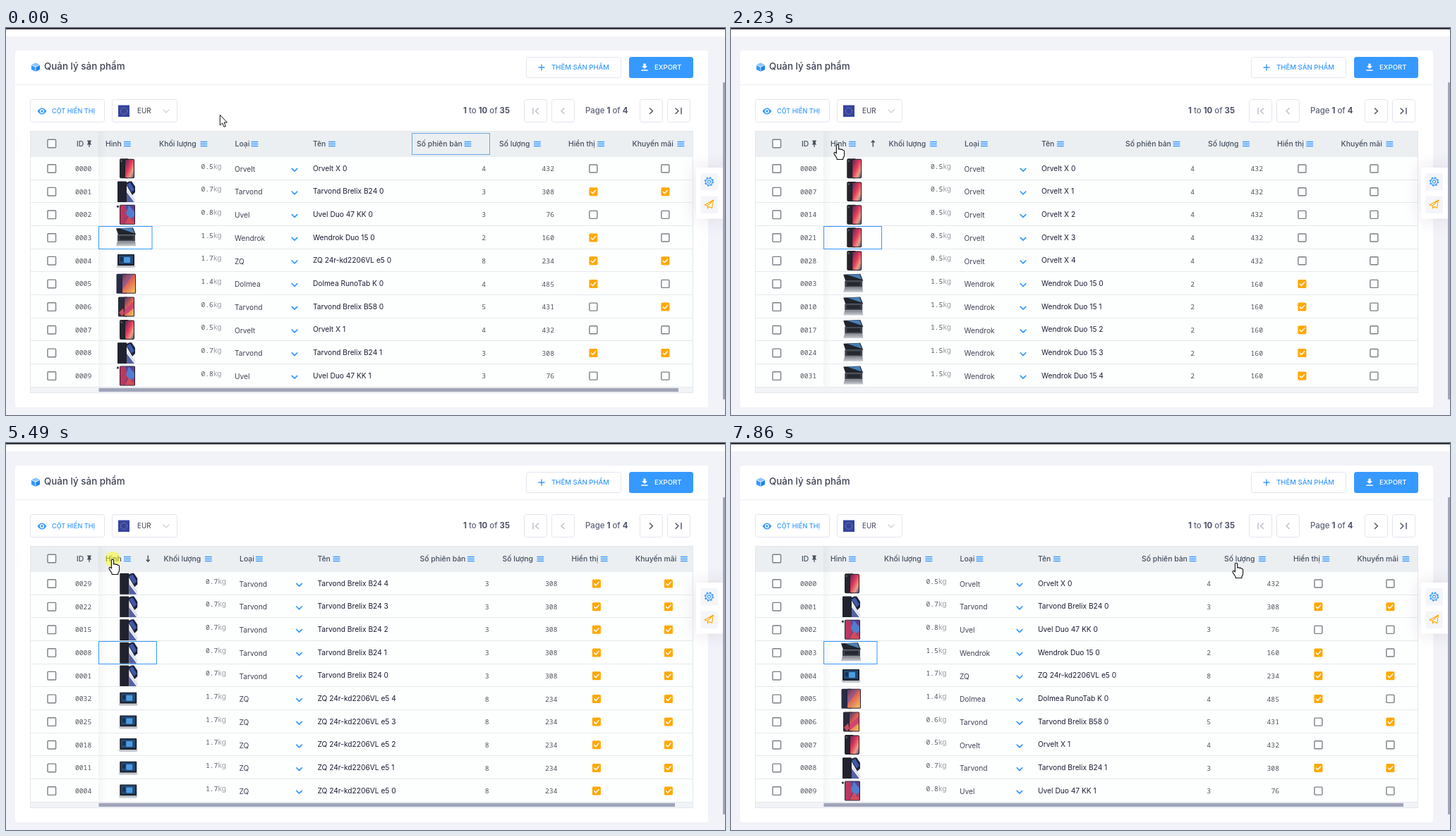
An HTML page for the animation above (8000 ms loop, 1019 px wide and 549 px high).

```html
<!DOCTYPE html>
<html lang="vi">
<head>
<meta charset="utf-8">
<title>Quản lý sản phẩm</title>
<style>
html, body { margin: 0; width: 100%; height: 100%; overflow: hidden; background: #f2f3f8; }
svg { display: block; width: 100%; height: 100%; }
text { font-family: Inter, "Open Sans", sans-serif; font-size: 10.2px; fill: #181c32; white-space: pre; }
.title { font-size: 13.4px; font-weight: 500; fill: #3f4254; }
.btn { font-size: 9.6px; font-weight: 500; fill: #3699ff; }
.small { font-size: 9.1px; }
.page { font-size: 11.4px; font-weight: 500; fill: #5e6278; }
.page .num { font-weight: 700; fill: #4d5166; }
.head { font-size: 10.4px; font-weight: 500; fill: #464e5f; }
.mono { font-family: "Noto Sans Mono", "DejaVu Sans Mono", monospace; font-size: 9.7px; fill: #50555c; }
.unit { font-family: Inter, sans-serif; font-size: 10.2px; fill: #9a9fa6; }
.type { fill: #3f4254; }
.box { fill: #fff; stroke: #e4e6ef; }
.line { fill: none; stroke-linecap: round; stroke-linejoin: round; stroke-width: 1.4; }
</style>
</head>
<body>
<svg viewBox="0 0 1019 549" preserveAspectRatio="none">
  <defs>
    <linearGradient id="shade"><stop stop-opacity=".035"/><stop offset="1" stop-opacity="0"/></linearGradient>
    <linearGradient id="rose" x2="1" y2="1"><stop stop-color="#5b2a58"/><stop offset=".45" stop-color="#e63a5c"/><stop offset=".75" stop-color="#e9a083"/><stop offset="1" stop-color="#44558f"/></linearGradient>
    <linearGradient id="dusk" x2=".7" y2="1"><stop stop-color="#4a3a72"/><stop offset=".5" stop-color="#e0604f"/><stop offset="1" stop-color="#efb05f"/></linearGradient>
    <linearGradient id="night" x2="1" y2="1"><stop stop-color="#3a62c8"/><stop offset=".5" stop-color="#5a3d8c"/><stop offset="1" stop-color="#d0405f"/></linearGradient>
    <linearGradient id="steel" x2="0" y2="1"><stop stop-color="#7d8189"/><stop offset="1" stop-color="#c9ccd2"/></linearGradient>
    <filter id="soft" x="-60%" y="-150%" width="220%" height="400%"><feDropShadow dx="0" dy="0" stdDeviation="11" flood-color="#523f69" flood-opacity=".15"/></filter>

    <g id="p0">
      <rect x="-9" y="-14" width="13" height="28" rx="2" fill="#24252c"/>
      <rect x="-2" y="-13.5" width="14" height="27.5" rx="2" fill="#1d1c24"/>
      <rect x="-1" y="-12.5" width="12" height="25.5" rx="1" fill="url(#rose)"/>
      <circle cx="-6.5" cy="-10.5" r="1.2" fill="#62636e"/>
    </g>
    <g id="p1">
      <rect x="-12" y="-14.5" width="25" height="30" fill="#f1f2f6"/>
      <rect x="-12" y="-14.5" width="13" height="30" rx="1" fill="#20222d"/>
      <path d="M-1-12L5-14.5H8L13-7V1L9 5Z" fill="#1c2135"/>
      <path d="M1-10L6-13L12-3L8 1Z" fill="#3f58a8"/>
      <path d="M1 1L12 15.5H1Z" fill="#5661a3"/>
      <path d="M2-1L13 13" stroke="#d7daea" stroke-width="1.5"/>
    </g>
    <g id="p2">
      <rect x="-9" y="-14" width="22" height="28" rx="1.5" fill="#25232f"/>
      <rect x="-8" y="-13" width="20" height="26" fill="url(#night)"/>
      <path d="M-8-13H-1L3 0L-3 13H-8Z" fill="#b93861"/>
      <path d="M4-13L12-4V2L5 7L0-2Z" fill="#4f7fd1"/>
      <path d="M-2 13L4 2L12 13Z" fill="#d34b5a"/>
      <rect x="-13" y="-13" width="3" height="3" rx="1" fill="#333"/>
    </g>
    <g id="p3">
      <path d="M-14-13L10-14L14-4H-11Z" fill="#20242c"/>
      <path d="M-9-13L9-13.5L12-6Z" fill="#4a7fb5"/>
      <path d="M-12-4H13V5H-12Z" fill="#3e424b"/>
      <path d="M-9-2H10V3H-9Z" fill="#252830"/>
      <path d="M-12 5H13L14 12H-14Z" fill="url(#steel)"/>
    </g>
    <g id="p4">
      <rect x="-12" y="-9" width="24" height="16" rx="1" fill="#1d222c"/>
      <rect x="-10" y="-7.5" width="20" height="12" fill="#234a78"/>
      <rect x="-3" y="-5" width="9" height="8" rx="1" fill="#4b9be0"/>
      <rect x="-8" y="-5" width="4" height="6" fill="#18304f"/>
      <path d="M-14 7H14L12 10H-12Z" fill="#c3c7cd"/>
    </g>
    <g id="p5">
      <rect x="-13.5" y="-14" width="15" height="28" rx="1.5" fill="#262b46"/>
      <rect x="-6" y="-14" width="20" height="28" rx="1.5" fill="#27263a"/>
      <rect x="-5" y="-13" width="18" height="26" fill="url(#dusk)"/>
      <path d="M-5 0L6-13H10L-5 8Z" fill="#7b5ba6" opacity=".7"/>
    </g>
    <g id="p6">
      <rect x="-11" y="-14" width="13" height="28" rx="1.5" fill="#2a2b3b"/>
      <rect x="-3" y="-14" width="15" height="28" rx="1.5" fill="#26222c"/>
      <rect x="-2" y="-13" width="13" height="26" fill="url(#dusk)"/>
      <path d="M-2 4L11-8V2L-2 12Z" fill="#d2456e"/>
      <path d="M-10 8L-4 2L-2 10L-6 13Z" fill="#c54f5f"/>
    </g>
    <path id="menu" class="line" stroke="#3699ff" d="M.5-3H9.3M.5 0H9.3M.5 3H9.3"/>
    <path id="arrow" fill="#fff" stroke="#111" stroke-linejoin="round" d="M.3.3V15L3.6 11.9L6 17.3L8.4 16.3L6.1 11H10.4Z"/>
    <path id="hand" fill="#fff" stroke="#111" stroke-width="1.1" stroke-linejoin="round" d="M-1.6 1.2Q0-.8 1.6 1.2V7Q3.2 6 4.6 7.4Q6.3 6.6 7.3 8.2Q9.6 8 9.6 10.5V15Q9.6 18 7.8 19.5V21.5H-.8V20L-4.8 13.6Q-5.4 11.6-3.8 11.2Q-2.6 11.2-1.6 13Z"/>
  </defs>

  <rect width="1019" height="549" fill="#f2f3f8"/>
  <rect width="1019" height="12" fill="#fff"/>
  <rect width="1019" height="1.8" fill="#20202a"/>
  <rect x="13" y="32" width="982" height="506" rx="3.5" fill="#fff"/>
  <path d="M13 80.5H995" stroke="#ebedf3"/>

  <path d="M36 52L42 49.3L48 52L42 54.7Z" fill="#8dc6ff"/>
  <path d="M36 52.8L41.6 55.4V61.8L36 59Z" fill="#3699ff"/>
  <path d="M48 52.8L42.4 55.4V61.8L48 59Z" fill="#1f83ea"/>
  <text class="title" x="54" y="59.4">Quản lý sản phẩm</text>

  <rect class="box" x="737.5" y="41.5" width="134" height="29" rx="3"/>
  <path class="line" stroke="#3699ff" d="M755 56H763M759 52V60"/>
  <text class="btn" x="773" y="59.3">THÊM SẢN PHẨM</text>
  <rect x="883" y="41" width="91" height="30" rx="3.5" fill="#3699ff"/>
  <path d="M903.3 50.5H906.7V54H909L905 58L901 54H903.3ZM900.3 59.2H909.7V60.8H900.3Z" fill="#fff"/>
  <text class="btn" x="919" y="59.3" style="fill:#fff">EXPORT</text>

  <rect class="box" x="34.5" y="101.5" width="105" height="32" rx="3"/>
  <path d="M44.5 118Q51 109 57.5 118Q51 127 44.5 118Z" fill="#3699ff"/>
  <circle cx="51" cy="118" r="3" fill="#fff"/><circle cx="51" cy="118" r="1.7" fill="#3699ff"/>
  <text class="btn small" x="65" y="121">CỘT HIỂN THỊ</text>
  <rect class="box" x="150.5" y="101.5" width="92" height="32" rx="3"/>
  <rect x="159" y="109.5" width="16" height="16.5" fill="#36449f"/>
  <circle cx="167" cy="117.8" r="4.6" fill="none" stroke="#c8c78a" stroke-width="1" stroke-dasharray=".9 1.51"/>
  <text x="186" y="121.3" style="font-size:9.8px;fill:#3f4254">EUR</text>
  <path class="line" stroke="#cfd2da" d="M223 116L227 120L231 116"/>

  <text class="page" x="648" y="121.3"><tspan class="num">1</tspan> to <tspan class="num">10</tspan> of <tspan class="num">35</tspan></text>
  <text class="page" x="821" y="121.3">Page <tspan class="num">1</tspan> of <tspan class="num">4</tspan></text>
  <g id="pager"></g>

  <g id="table"></g>
  <g id="wait">
    <rect x="34" y="146" width="940" height="372" fill="#fff" opacity=".6"/>
    <rect x="443.5" y="313" width="121.5" height="36" rx="3" fill="#fff" filter="url(#soft)"/>
    <text x="464" y="334.6" style="font-size:9.9px;fill:#3f4254">Please wait...</text>
    <circle cx="538" cy="331" r="5.5" fill="#3699ff"/>
  </g>

  <rect x="978" y="198" width="45" height="72.5" rx="3" fill="#fff" filter="url(#soft)"/>
  <rect x="984.5" y="206" width="24.5" height="24.5" rx="3" fill="#f3f5f9"/>
  <rect x="984.5" y="238.5" width="24.5" height="24.5" rx="3" fill="#f3f5f9"/>
  <g fill="none" stroke="#3699ff" stroke-width="1.1" transform="translate(996.5 218)">
    <circle r="4.8"/><circle r="2.1"/><circle r="5.9" stroke-width="1.6" stroke-dasharray="2.3 2.33"/>
  </g>
  <path class="line" stroke="#ffa800" style="stroke-width:1.1" transform="translate(996.5 250)" d="M-6.5 1L6-6L4 5.5L0 3.4L-2 6L-2.2 2.2ZM-2.2 2.2L6-6"/>
  <rect x="1016" y="77" width="3" height="450" rx="1" fill="#a2a5b9"/>

  <circle id="press" r="11" fill="#ff0" opacity=".47"/>
  <use id="cursor"/>
</svg>
<script>
const LOOP = 8000, ROW = 32.68, LATE_SHIFT = 38.5;
const $ = id => document.getElementById(id);

// type, model, weight, versions, quantity, visible, promoted
const products = [
  ["Orvelt", "Orvelt X", "0.5", 4, 432, 0, 0],
  ["Tarvond", "Tarvond Brelix B24", "0.7", 3, 308, 1, 1],
  ["Uvel", "Uvel Duo 47 KK", "0.8", 3, 76, 0, 0],
  ["Wendrok", "Wendrok Duo 15", "1.5", 2, 160, 1, 0],
  ["ZQ", "ZQ 24r-kd2206VL e5", "1.7", 8, 234, 1, 1],
  ["Dolmea", "Dolmea RunoTab K", "1.4", 4, 485, 1, 0],
  ["Tarvond", "Tarvond Brelix B58", "0.6", 5, 431, 0, 1]
];
const orders = {
  plain: i => i,
  up: i => i < 5 ? i * 7 : 3 + (i - 5) * 7,
  down: i => i < 5 ? 29 - i * 7 : 32 - (i - 5) * 7
};

// off: widening of the sorted column; name, ver: column starts; thumb: right end of the scroll thumb
const plain = { off: 0, name: 435, ver: 582, thumb: 953, order: "plain" };
const short = { off: 6.5, name: 440, ver: 559, order: "up", sort: 1 };
const wide = { off: 6.5, name: 441.5, ver: 586.5, thumb: 948, order: "down", sort: -1 };
const states = [
  [0, { ...plain, focus: true }],
  [910, plain],
  [990, { ...plain, off: 6.5, name: 441.5, ver: 588.5, thumb: 945, sort: 1 }],
  [1910, { ...short, late: true }],
  [2150, short],
  [3540, { ...short, sort: -1 }],
  [4470, { ...wide, thumb: 0, late: true }],
  [4780, wide],
  [5720, { off: 0, name: 435, ver: 580, thumb: 956, order: "down" }],
  [6660, { ...plain, thumb: 0, late: true }],
  [6800, plain]
];
const waits = [1140, 3700, 5870];
const presses = [[910, 990], [3470, 3540], [5490, 5560], [7790, 7860]];
const path = [
  [70, 303, 123], [300, 262, 170], [500, 215, 184], [700, 165, 172], [830, 151, 165],
  [5870, 151, 165], [6200, 361, 170], [6660, 560, 178], [6910, 587, 180], [7480, 716, 170]
];

const text = (cls, x, y, s, end) =>
  `<text class="${cls}" x="${x}" y="${y}"${end ? ' text-anchor="end"' : ""}>${s}</text>`;
const rect = (x, y, w, h, style) => `<rect x="${x}" y="${y}" width="${w}" height="${h}" ${style}/>`;
const line = (d, color) => `<path class="line" stroke="${color}" d="${d}"/>`;
const use = (id, x, y) => `<use href="#${id}" x="${x}" y="${y}"/>`;

function check(x, y, on, size = 11) {
  const h = size / 2;
  if (!on) return rect(x - h, y - h, size, size, 'rx="1" fill="#fff" stroke="#7b7f85" stroke-width="1.4"');
  return rect(x - 6, y - 6, 12, 12, 'rx="1.5" fill="#ffa800"') +
    line(`M${x - 3.2} ${y + .2}l2.2 2.4l4.3-4.8`, "#fff");
}

function header(s) {
  const y = 168, v = s.ver;
  const cols = [
    ["Hình", 141, 26], ["Khối lượng", 217 + s.off, 58.5], ["Loại", 324.5 + s.off, 23],
    ["Tên", s.name, 22], ["Số phiên bản", v, 67.5], ["Số lượng", v + 117, 49],
    ["Hiển thị", v + 215, 41.3], ["Khuyến mãi", v + 305.5, 64]
  ];
  let out = rect(34, 146, 940, 37, 'fill="#ebeff2"');
  if (s.focus) out += rect(575.5, 149.5, 110, 30, 'fill="none" stroke="#6ea8e0"');
  out += check(64.8, 164, 0, 11.6) + text("head", 100, y - .5, "ID");
  out += '<path d="M115.3 159.5H120.7V161H119.8V163.6L121.3 165.4H118.6V169H117.4V165.4H114.7L116.2 163.6V161H115.3Z" fill="#464e5f"/>';
  for (const [label, x, gap] of cols) out += text("head", x, y, label) + use("menu", x + gap, 164.5);
  if (s.sort) {
    out += `<g transform="translate(201.3 164) scale(1 ${s.sort})">${line("M0 4V-4M-2-2L0-4.2L2-2", "#464e5f")}</g>`;
  }
  return out;
}

function row(s, i) {
  const id = orders[s.order](i), kind = id % 7;
  const [type, model, weight, versions, count, visible, promo] = products[kind];
  const y = 199.3 + ROW * i, v = s.ver;
  let out = check(64.8, y + .2, 0, 11.6) +
    text("mono", 98, y + 3.6, String(id).padStart(4, "0")) +
    use("p" + kind, 170 + s.off / 2, y) +
    text("mono", 305.5 + s.off, y + .2, `${weight}<tspan class="unit">kg</tspan>`, true) +
    text("name", s.name, y + 3.2, `${model} ${Math.floor(id / 7)}`) +
    text("mono", v + 98, y + 3.8, versions, true) +
    text("mono", v + 195, y + 3.8, count, true);
  if (!s.late) {
    const x = s.name - 26;
    out += text("type", 324 + s.off, y + 4.5, type) +
      line(`M${x - 3.8} ${y}l3.8 3.8l3.8-3.8`, "#3699ff").replace("/>", ' style="stroke-width:1.7"/>');
  }
  // cells that are still being filled sit a little higher
  const cy = s.late ? y - 4.3 : y + .2;
  if (!s.late || [0, 5, 6, 8, 9].includes(i)) out += check(v + 250.4, cy, visible);
  if (!s.late || [0, 1, 2, 6, 9].includes(i)) out += check(v + 352.4, cy, promo);
  return out;
}

function table(s) {
  if (s.late) s = { ...s, name: s.name - LATE_SHIFT, ver: s.ver - (s.off ? LATE_SHIFT : LATE_SHIFT + 1) };
  let out = rect(34, 146, 940, 372, 'fill="#fdfefe"') + header(s);
  out += rect(131, 146, 12, 364, 'fill="url(#shade)"');
  for (let i = 0; i < 10; i++) {
    const y = Math.round(183 + ROW * (i + 1)) - .5;
    out += row(s, i) + `<path d="M34 ${y}H974" stroke="#e6eaed"/>`;
  }
  out += rect(34, 510, 940, 8, 'fill="#f1f3f6"');
  if (s.thumb) out += rect(131.5, 510.8, s.thumb - 131.5, 5.2, 'fill="#a0a4b8"');
  out += rect(131.5, 281.5, 75.5 + s.off, 32, 'fill="none" stroke="#3699ff"');
  return out + rect(34.5, 146.5, 939, 371, 'fill="none" stroke="#e3e8ec"');
}

function pager() {
  const off = "#b9bcc9", on = "#4a4e60";
  const left = x => `M${x + 2} 114L${x - 2} 117.7L${x + 2} 121.4`;
  const right = x => `M${x - 2} 114L${x + 2} 117.7L${x - 2} 121.4`;
  const bar = x => `M${x} 113.6V121.8`;
  return [734.5, 773.5, 898.5, 937.5].map(x => rect(x, 101.5, 32, 32, 'class="box" rx="3"')).join("") +
    line(bar(747) + left(752.5), off) + line(left(789), off) +
    line(right(914.5), on) + line(right(951), on) + line(bar(957), on);
}

function waitLevel(t) {
  for (const start of waits) {
    const p = t - start;
    if (p >= 0 && p < 770) return Math.min(1, p / 200, (770 - p) / 330);
  }
  return 0;
}

function pointAt(t) {
  const n = path.findIndex(p => p[0] > t);
  if (n === 0) return path[0].slice(1);
  if (n < 0) return path[path.length - 1].slice(1);
  const [a, b] = [path[n - 1], path[n]], k = (t - a[0]) / (b[0] - a[0]);
  return [a[1] + (b[1] - a[1]) * k, a[2] + (b[2] - a[2]) * k];
}

let shown;
function draw(t) {
  const state = states.filter(s => s[0] <= t).pop();
  if (state !== shown) {
    $("table").innerHTML = table(state[1]);
    shown = state;
  }
  const level = waitLevel(t), [x, y] = pointAt(t);
  $("wait").setAttribute("opacity", level);
  $("cursor").setAttribute("href", !level && y > 146 && y < 183 ? "#hand" : "#arrow");
  $("cursor").setAttribute("transform", `translate(${x} ${y})`);
  $("press").setAttribute("transform", `translate(${x} ${y})`);
  $("press").setAttribute("visibility", presses.some(([a, b]) => t >= a && t < b) ? "visible" : "hidden");
}

$("pager").innerHTML = pager();
const begin = performance.now();
function tick() {
  draw((performance.now() - begin) % LOOP);
  requestAnimationFrame(tick);
}
tick();
</script>
</body>
</html>
```
